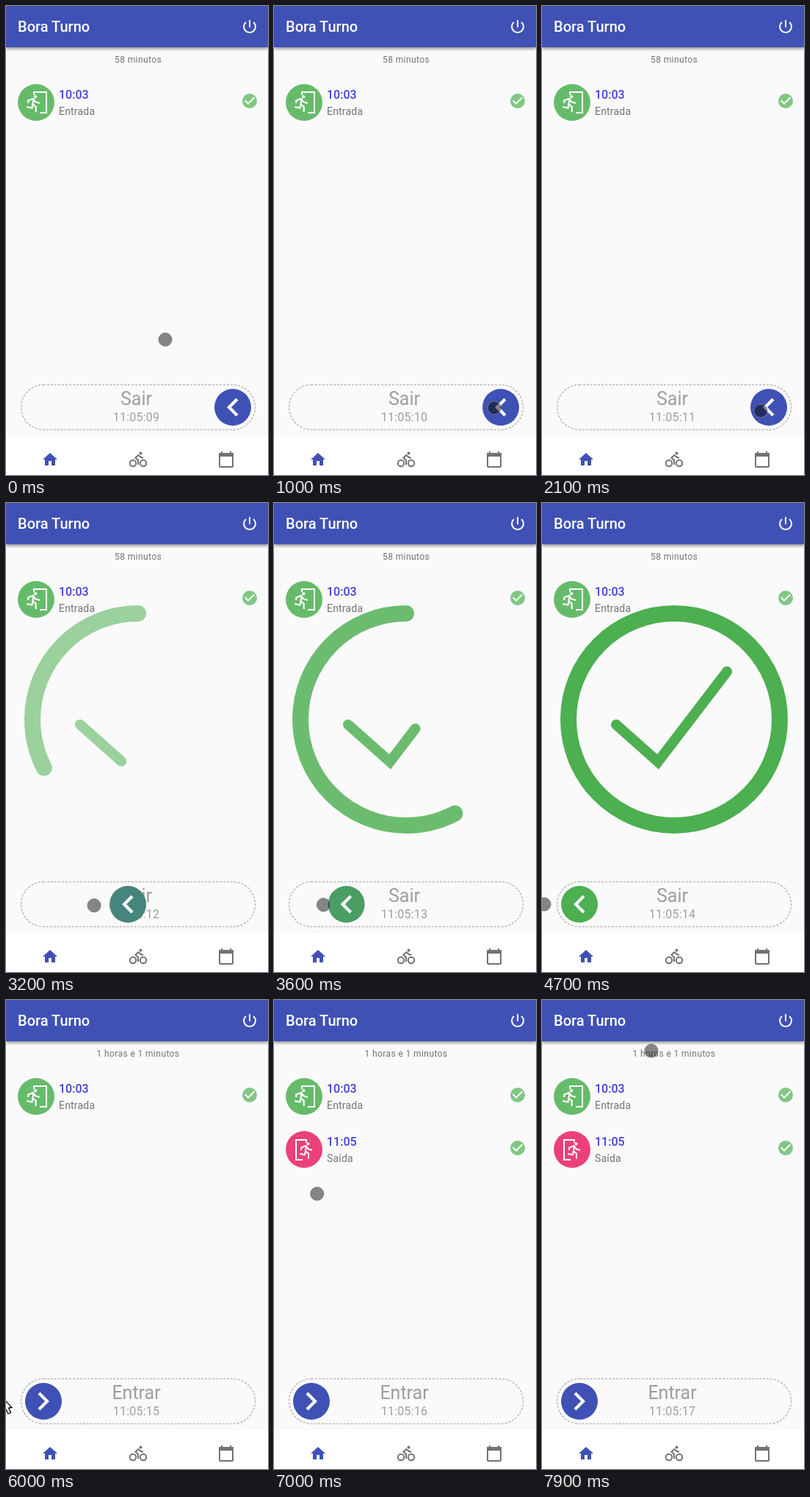
These frames come from a looping animation (357 by 637 pixels, 8 s). An HTML page:

```html
<!DOCTYPE html>
<html lang="pt">
<head>
<meta charset="utf-8">
<title>Ponto</title>
<style>
  html, body { margin: 0; width: 100%; height: 100%; overflow: hidden; background: #fafafa; }
  svg { display: block; font-family: Roboto, sans-serif; }
  .soft { filter: blur(.5px); }
  .bar { filter: drop-shadow(0 2px 2px #0007); }
  .title { font: 500 20px Roboto, sans-serif; fill: #fff; }
  .total { font-size: 12px; letter-spacing: .4px; }
  .hour { font: 500 16px Roboto, sans-serif; fill: #4340dc; }
  .kind { font-size: 14px; letter-spacing: .2px; }
  .total, .kind, .icon { fill: #727272; }
  .mid { text-anchor: middle; }
  .line { fill: none; stroke: #fff; stroke-width: 2; }
  .gray { stroke: #727272; }
  .mark { fill: none; stroke: #4caf50; stroke-linecap: round; }
</style>
</head>
<body>
<svg width="357" height="637" viewBox="0 0 357 637">
  <defs>
    <g id="runner">
      <circle cx="13.5" cy="3.5" r="2" fill="#fff"/>
      <path class="line" d="M4 12V8.6L10.5 6L13.5 10.3L19 12M11 6.5L9 18.2L2.2 16.8M10.3 13.5L14 16.5V23.4"/>
    </g>
    <g id="done">
      <circle cx="332" cy="129" r="10" fill="#81c784"/>
      <path class="line" d="M325.7 128.3l4.3 4.3 8.3-8.3"/>
    </g>
  </defs>

  <g class="soft">
    <rect width="357" height="637" fill="#fafafa"/>
    <rect class="bar" width="357" height="56" fill="#3f51b5"/>
    <text class="title" x="16" y="35">Bora Turno</text>
    <path class="line" d="M332 19v10M326.9 21.9a8 8 0 1 0 10.2 0"/>
    <text class="total mid" id="total" x="180" y="77"></text>

    <circle cx="41" cy="131" r="25" fill="#66bb6a"/>
    <path class="line" d="M38 121v-4h17v28h-9"/>
    <use href="#runner" transform="translate(26 119.5) scale(1.05)"/>
    <text class="hour" x="72" y="126">10:03</text>
    <text class="kind" x="72" y="148">Entrada</text>
    <use href="#done"/>

    <g id="exit">
      <circle cx="41" cy="203" r="25" fill="#ec407a"/>
      <path class="line" d="M44 194v-4h-14v27h9"/>
      <use href="#runner" x="33" y="192"/>
      <text class="hour" x="72" y="198">11:05</text>
      <text class="kind" x="72" y="220">Saída</text>
      <use href="#done" y="72"/>
    </g>

    <rect x="20.5" y="514.5" width="319" height="61" rx="30.5" fill="none" stroke="#b8b8b8" stroke-width="1.5" stroke-dasharray="3 2"/>
    <text class="mid" id="action" x="177.5" y="542" font-size="25" fill="#9e9e9e"></text>
    <text class="mid" id="clock" x="177.5" y="564" font-size="16" letter-spacing=".2" fill="#9e9e9e"></text>

    <g id="progress">
      <path class="mark" pathLength="1" stroke-width="22" d="M180 150a144 144 0 0 0 0 288a144 144 0 0 0 0-288"/>
      <path class="mark" pathLength="1" stroke-width="14" d="M101 301L158 351.5L252 229"/>
    </g>

    <g id="button">
      <circle r="25"/>
      <path class="line" id="chevron" style="stroke-width: 4.2px" d="M6-11L-5 0L6 11"/>
    </g>

    <rect y="584" width="357" height="53" fill="#fff"/>
    <path fill="#3f51b5" d="M58 624v-6h4v6h5v-8h3l-10-9-10 9h3v8z"/>
    <g class="icon" transform="translate(168 604)">
      <circle cx="15.5" cy="3.5" r="2"/>
      <path class="line gray" d="M19 10L15.7 8.8L12.2 6L8.4 9.7L12 13V19"/>
      <circle class="line gray" cx="5" cy="17" r="4.2"/>
      <circle class="line gray" cx="19" cy="17" r="4.2"/>
    </g>
    <rect class="line gray" x="291" y="608" width="18" height="18" rx="1"/>
    <path class="icon" d="M290 607h20v5h-20zM293 605h2v3h-2zM305 605h2v3h-2z"/>
  </g>

  <circle id="touch" r="9" fill="#0007" stroke="#777"/>
  <path id="arrow" d="M-4 541L8 553.5L3.5 554L6.5 560.5L3 562L0 556L-4 560z" fill="#fff" stroke="#000" stroke-width="1.3"/>
</svg>
<script>
const $ = id => document.getElementById(id);
const blue = [63, 81, 181], green = [76, 175, 80];

// Each glide: start, end, and the point reached.
const home = [217, 453];
const glides = [
  [100, 1300, 312, 559], [1300, 1500, 318, 550], [1800, 2400, 287, 550],
  [2700, 3400, 90, 546], [3400, 4500, 3, 545],
  [6600, 7500, 98, 64], [7500, 7900, 149, 69]
];

// Progress from 0 to 1 between two times, slowing down for powers above 1.
function ease(t, from, to, power = 1.5) {
  const u = Math.min(1, Math.max(0, (t - from) / (to - from)));
  return 1 - (1 - u) ** power;
}

const mix = (a, b, f) => a.map((v, i) => v + (b[i] - v) * f);
const move = (id, x, y) => $(id).setAttribute('transform', `translate(${x} ${y})`);

function draw(t) {
  const left = t >= 5300;
  const away = t >= 5400 && t < 6700;
  const pull = ease(t, 2680, 4500, 2.4);
  const tint = left ? 0 : pull;
  const seconds = 10 + Math.floor((t - 230) / 995);
  const touch = glides.reduce((p, [from, to, ...end]) => mix(p, end, ease(t, from, to)), home);

  $('total').textContent = t < 6000 ? '58 minutos' : '1 horas e 1 minutos';
  $('action').textContent = left ? 'Entrar' : 'Sair';
  $('clock').textContent = '11:05:' + String(seconds).padStart(2, '0');

  $('progress').style.opacity = tint;
  for (const path of $('progress').children) {
    path.setAttribute('stroke-dasharray', ease(t, 2750, 4700) + ' 2');
  }

  move('button', 309 - 258 * pull, 545);
  $('button').setAttribute('fill', `rgb(${mix(blue, green, tint).map(Math.round)})`);
  $('chevron').setAttribute('transform', `scale(${left ? -1 : 1} 1)`);

  $('exit').style.opacity = ease(t, 6000, 6200, 1);
  move('touch', ...touch);
  $('touch').style.opacity = +!away;
  $('arrow').style.opacity = +away;
}

const start = performance.now();
function tick() {
  // The picture advances ten times a second.
  draw(Math.floor((performance.now() - start) % 8000 / 100) * 100);
  requestAnimationFrame(tick);
}
tick();
</script>
</body>
</html>
```
